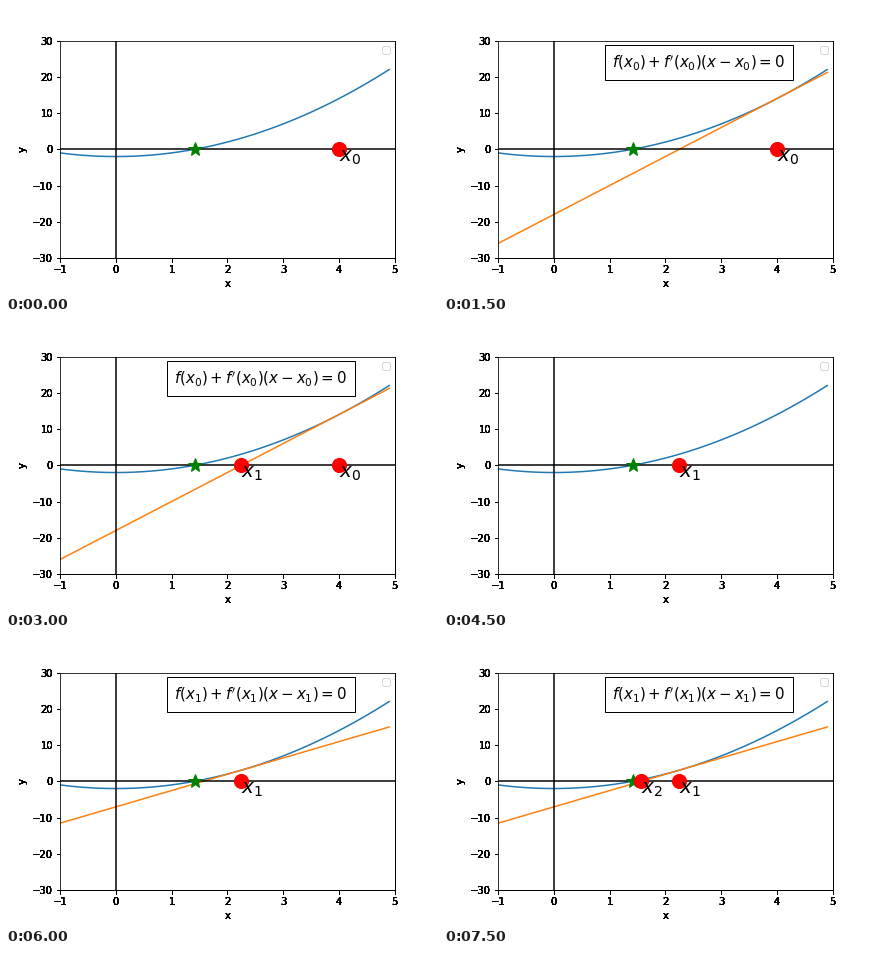
A matplotlib script that plays this animation: 432x288 px, repeating every 8000 ms.

```python
import numpy as np
import matplotlib.pyplot as plt
from matplotlib.animation import FuncAnimation

STEP = 500          # ms per frame
FRAMES = 16
STAGE = 3           # frames per stage
LAYERS = 8          # stacked axes give the heavy tick labels


def f(x):
    return x**2 - 2


def df(x):
    return 2 * x


def newton(x):
    return x - f(x) / df(x)


def add_axes():
    ax = fig.add_axes([0.125, 0.125, 0.775, 0.755])
    ax.set(xlim=(-1, 5), ylim=(-30, 30), xlabel="x", ylabel="y")
    return ax


def add_guess():
    dot, = ax.plot([], [], "o", color="red", ms=14.1, zorder=3)
    label = ax.text(0, -3.5, "", fontsize=20, zorder=4)
    return dot, label


def place(guess, n, x, shown=True):
    dot, label = guess
    dot.set_data([x], [0])
    label.set_x(x)
    label.set_text(f"$x_{n}$")
    dot.set_visible(shown)
    label.set_visible(shown)


fig = plt.figure(figsize=(6, 4), dpi=72, facecolor="white")
for _ in range(LAYERS):
    ax = add_axes()

xs = np.arange(-1, 5, 0.1)
ax.plot(xs, f(xs), color="C0")
tangent, = ax.plot([], [], color="C1")
ax.axhline(0, color="black")
ax.axvline(0, color="black")
ax.plot(np.sqrt(2), 0, "*", color="green", ms=14.1, zorder=2.5)
ax.legend([], [], loc="upper right")

current, following = add_guess(), add_guess()
formula = ax.text(0.6, 0.9, "", fontsize=15, ha="center", va="center",
                  transform=ax.transAxes, zorder=4,
                  bbox=dict(facecolor="white", edgecolor="black", pad=8))

guesses = [4.0]
for _ in range(2):
    guesses.append(newton(guesses[-1]))


def draw(i):
    n, stage = divmod(i // STAGE, 3)
    x = guesses[n]
    place(current, n, x)
    place(following, n + 1, guesses[n + 1], stage == 2)
    tangent.set_data(xs, f(x) + df(x) * (xs - x))
    formula.set_text(rf"$f(x_{n})+f'(x_{n})(x-x_{n})=0$")
    for part in (tangent, formula):
        part.set_visible(stage > 0)
    return (*current, *following, tangent, formula)


anim = FuncAnimation(fig, draw, frames=FRAMES, interval=STEP,
                     init_func=lambda: draw(0), repeat=True, repeat_delay=0)
plt.show()
```
